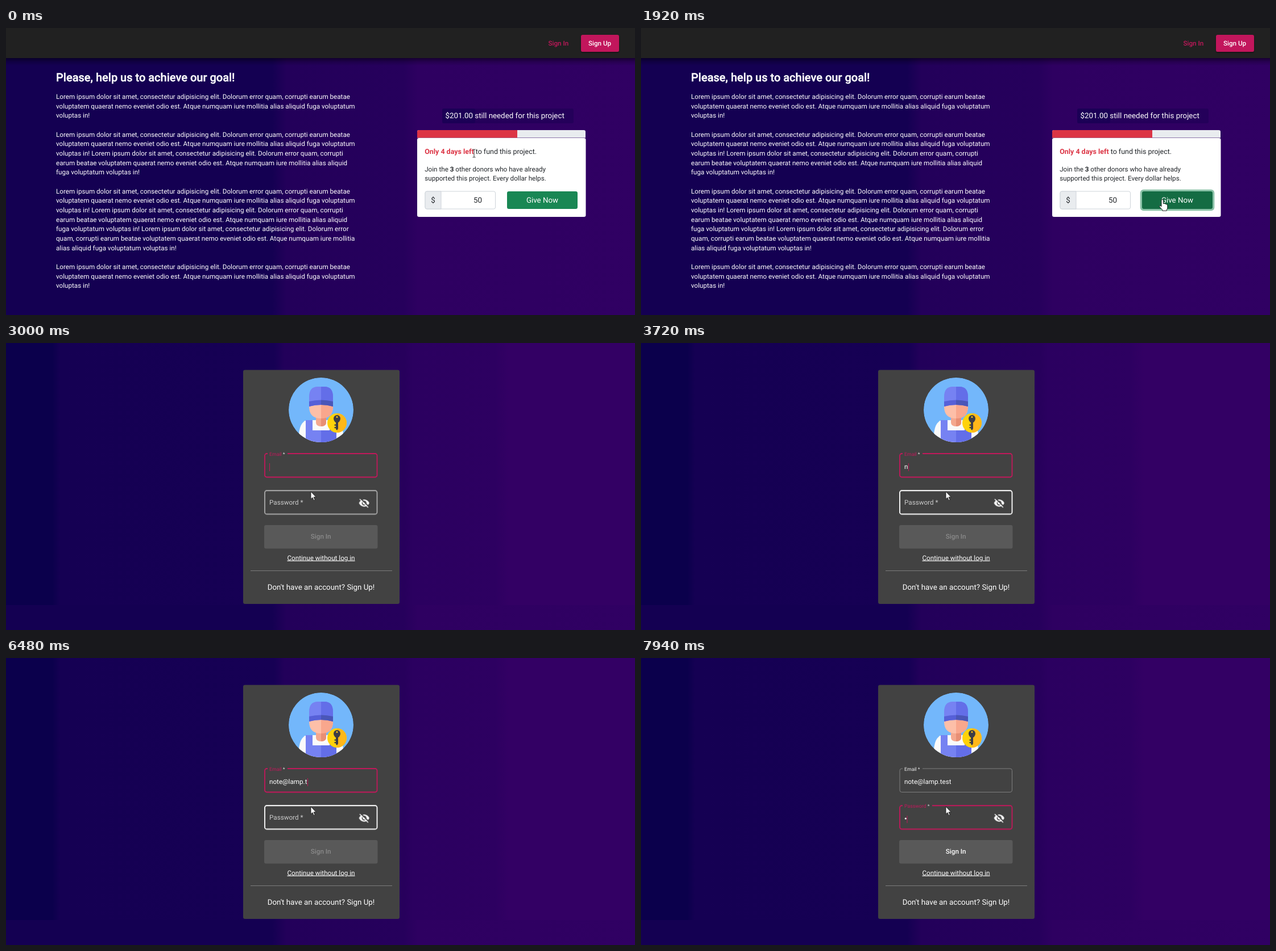
An HTML page for the animation above (8000 ms loop, 1106 by 506 pixels).

```html
<!DOCTYPE html>
<html lang="en">
<head>
<meta charset="utf-8">
<title>Fundraising sign in</title>
<style>
  html, body { margin: 0; width: 100%; height: 100%; overflow: hidden; background: #140052; }
  svg { display: block; width: 1106px; height: 506px; }
  text { font: 400 11.667px Roboto, sans-serif; fill: #fff; text-rendering: geometricPrecision; white-space: pre; }
  .lead { font-size: 13.333px; }
  .medium { font-weight: 500; }
  .mid { text-anchor: middle; }
  .dark text { fill: #212529; }
  .small { font-size: 8.75px; }
  .field { fill: none; stroke: #7f7f7f; }
  .caret { fill: #c2185b; }
</style>
</head>
<body>
<svg viewBox="0 0 1106 506">
  <defs>
    <linearGradient id="pageBg" gradientUnits="userSpaceOnUse" x2="1106">
      <stop offset=".423" stop-color="#140052"/><stop offset=".446" stop-color="#23005a"/>
      <stop offset=".632" stop-color="#26005c"/><stop offset=".655" stop-color="#2e0061"/>
      <stop offset="1" stop-color="#300063"/>
    </linearGradient>
    <linearGradient id="loginBg" gradientUnits="userSpaceOnUse" x2="1106">
      <stop offset=".074" stop-color="#0b004c"/><stop offset=".086" stop-color="#150053"/>
      <stop offset=".426" stop-color="#160054"/><stop offset=".443" stop-color="#22005a"/>
      <stop offset=".633" stop-color="#27005c"/><stop offset=".647" stop-color="#2b0060"/>
      <stop offset=".778" stop-color="#2d0061"/><stop offset=".8" stop-color="#330064"/>
    </linearGradient>
    <linearGradient id="navShade" x2="0" y2="1">
      <stop stop-opacity=".5"/><stop offset=".5" stop-opacity=".18"/><stop offset="1" stop-opacity="0"/>
    </linearGradient>
    <filter id="lift" x="-10%" y="-20%" width="120%" height="150%">
      <feDropShadow dx="0" dy="1.5" stdDeviation="1.2" flood-opacity=".5"/>
    </filter>
    <clipPath id="round"><circle cx="554" cy="118" r="57"/></clipPath>
    <clipPath id="rightHalf"><path d="M554 60h60v120h-60z"/></clipPath>
    <path id="notched" d="M0 0"/>
    <path id="cap" d="M533 112V95q0-18 15-18h12q15 0 15 18v17q-10-3-21-3t-21 3z"/>
    <path id="visor" d="M533 103q21-5 42 0v9q-10-3-21-3t-21 3z"/>
    <path id="face" d="M533 110q21-4 42 0v2q0 21-21 21t-21-21z"/>
    <path id="neck" d="M545 128h18v12q0 7-9 7t-9-7z"/>
    <path id="overall" d="M527 136h12v18h30v-18h12v40h-54z"/>
  </defs>

  <rect width="1106" height="506" fill="url(#pageBg)"/>

  <g id="project">
    <rect y="53" width="1106" height="13" fill="url(#navShade)"/>
    <rect width="1106" height="53" fill="#212121"/>
    <text class="medium mid" x="971.3" y="31" style="fill:#c2185b">Sign In</text>
    <rect x="1011" y="12" width="67" height="30" rx="3.3" fill="#c2185b" filter="url(#lift)"/>
    <text class="medium mid" x="1044" y="31">Sign Up</text>

    <text class="medium" x="88" y="94" style="font-size:20px" stroke="#fff" stroke-width=".4">Please, help us to achieve our goal!</text>
    <g id="story"></g>

    <rect x="767" y="142" width="231" height="26" rx="3" fill="#24005a"/>
    <rect x="767" y="142" width="58" height="26" rx="3" fill="#1b0056"/>
    <text class="lead" x="772.6" y="159.4">$201.00 still needed for this project</text>

    <path d="M723 193.5V183q0-3 3-3h290q3 0 3 3v10.5z" fill="#e9ecef"/>
    <path d="M723 193.5V183q0-3 3-3h173v13.5z" fill="#dc3545"/>
    <rect x="723" y="194" width="296.5" height="139" rx="3.3" fill="#fff"/>
    <g class="dark">
      <text x="736.2" y="221.5" style="font-size:12.45px"><tspan fill="#dc3545" font-weight="700">Only 4 days left</tspan> to fund this project.</text>
      <text x="736.2" y="252.5">Join the <tspan font-weight="700">3</tspan> other donors who have already</text>
      <text x="736.2" y="269.2">supported this project. Every dollar helps.</text>
      <rect x="737" y="288" width="123.5" height="31" rx="3" fill="#fff" stroke="#ced4da"/>
      <path d="M765 288v31h-25q-3 0-3-3v-25q0-3 3-3z" fill="#e9ecef" stroke="#ced4da"/>
      <text class="lead mid" x="751" y="307.8">$</text>
      <text class="lead" x="822" y="307.8">50</text>
    </g>
    <rect id="ring" x="877.7" y="284.7" width="130.6" height="37.6" rx="6" fill="#8cc3a9"/>
    <rect id="give" x="881" y="288" width="124" height="31" rx="3.3"/>
    <text class="lead mid" x="943" y="307.8">Give Now</text>
  </g>

  <g id="login">
    <rect width="1106" height="462" fill="url(#loginBg)"/>
    <rect x="417" y="47.5" width="275" height="412.5" rx="3.3" fill="#424242"/>

    <g clip-path="url(#round)">
      <circle cx="554" cy="118" r="57" fill="#73b7fb"/>
      <path d="M515 176q-2-36 14-40h50q16 4 14 40z" fill="#fafafa"/>
      <use href="#overall" fill="#7682f2"/>
      <use href="#neck" fill="#f4a88f"/>
      <use href="#face" fill="#fdbfa8"/>
      <use href="#cap" fill="#7682f2"/>
      <use href="#visor" fill="#5660d8"/>
      <g clip-path="url(#rightHalf)">
        <use href="#overall" fill="#636ee8"/>
        <use href="#neck" fill="#e88f75"/>
        <use href="#face" fill="#f9a78d"/>
        <use href="#cap" fill="#636ee8"/>
        <use href="#visor" fill="#4a56b8"/>
      </g>
    </g>
    <circle cx="582" cy="141" r="17" fill="#ffd20a"/>
    <path d="M582 124a17 17 0 0 1 0 34z" fill="#ffb81a"/>
    <path d="M580 138h4v13l-2 3-2-2zM577.5 143.5h3v2.2h-3zM577.5 148h3v2.2h-3z" fill="#3d3d46"/>
    <path fill-rule="evenodd" d="M576 133a6 6 0 0 1 12 0q0 4-3.5 7h-5q-3.5-3-3.5-7zM580.5 130.5a1.5 1.5 0 0 1 3 0a1.5 1.5 0 0 1-3 0z" fill="#3d3d46"/>

    <path id="emailBox" class="field" d="M495 195H649a3.5 3.5 0 0 1 3.5 3.5V233a3.5 3.5 0 0 1-3.5 3.5H458.5a3.5 3.5 0 0 1-3.5-3.5V198.5a3.5 3.5 0 0 1 3.5-3.5H460"/>
    <text class="small" x="463" y="199"><tspan id="emailLabel">Email</tspan> <tspan fill="#ddd">*</tspan></text>
    <text id="email" x="463" y="222.3"></text>
    <rect id="emailCaret" class="caret" y="212" width="1" height="14"/>

    <g transform="translate(0 65.2)">
      <rect id="passIdle" class="field" x="455" y="195" width="197.5" height="41.5" rx="3.5"/>
      <path id="passActive" class="field" d="M512 195H649a3.5 3.5 0 0 1 3.5 3.5V233a3.5 3.5 0 0 1-3.5 3.5H458.5a3.5 3.5 0 0 1-3.5-3.5V198.5a3.5 3.5 0 0 1 3.5-3.5H460" style="stroke:#c2185b;stroke-width:1.8px"/>
    </g>
    <g id="passLabel"><text><tspan id="passWord">Password</tspan> <tspan fill="#ccc">*</tspan></text></g>
    <circle id="dot" cx="465.3" cy="283" r="1.6" fill="#fff"/>
    <rect id="passCaret" class="caret" y="278" width="1" height="13"/>

    <text id="iconName" x="620" y="291" style="font:17.6px 'Liberation Serif',serif">visibility_off</text>
    <g id="eye" transform="translate(629.7 282.2)" fill="#fff">
      <path d="M-9 0C-5.5-8.3 5.5-8.3 9 0C5.5 8.3-5.5 8.3-9 0z"/>
      <circle r="4.2" fill="#424242"/><circle r="2.5"/>
      <path d="M-6.5-8.5L8.5 6.5" stroke="#424242" stroke-width="1.8"/>
      <path d="M-7.8-7L7 7.7" stroke="#fff" stroke-width="1.5"/>
    </g>

    <rect id="submitShade" x="454" y="321" width="199.5" height="41.5" rx="3.3" fill="#c2185b" filter="url(#lift)"/>
    <rect id="submit" x="454" y="321" width="199.5" height="41.5" rx="3.3"/>
    <text id="submitText" class="medium mid" x="553.7" y="345.3">Sign In</text>
    <text class="mid" x="554" y="382.5" text-decoration="underline">Continue without log in</text>
    <path d="M430 401.5H679" stroke="#7c7c7c"/>
    <text id="signUp" class="lead mid" x="554" y="435">Don't have an account? Sign Up!</text>
  </g>

  <g id="cursor">
    <path id="beam" d="M-2.5-7H-1Q0-7 0-6Q0-7 1-7H2.5M0-6V6M-2.5 7H-1Q0 7 0 6Q0 7 1 7H2.5" fill="none" stroke="#333"/>
    <path id="hand" d="M-3 1a1.7 1.7 0 0 1 3.4 0v5.5q2.6-.7 3 .6q2.2-.4 2.6 1q1.8 0 1.8 1.8v4q0 1.6-1.5 3.6v1.7h-7.5v-1.7L-6 12.5q-1-2.4 1-2.6l2 1.8z" fill="#fff" stroke="#111" stroke-width=".9"/>
    <path id="arrow" d="M0 0V13.2l3-2.7l2.2 5l2-.9l-2.2-4.8h4.2z" fill="#fff" stroke="#111" stroke-width=".8"/>
  </g>
</svg>

<script>
const LOOP = 8000;
const PINK = '#c2185b';
const $ = id => document.getElementById(id);
const SVG = 'http://www.w3.org/2000/svg';

function addText(parent, tag, content, attrs = {}) {
  const el = document.createElementNS(SVG, tag);
  el.textContent = content;
  for (const key in attrs) el.setAttribute(key, attrs[key]);
  return parent.appendChild(el);
}

// Holds each value from its time until the next stop.
function track(el, prop, stops) {
  const last = stops[stops.length - 1][1];
  const frames = [...stops, [LOOP, last]].map(([time, value]) =>
    ({ offset: time / LOOP, [prop]: value, easing: 'step-end' }));
  el.animate(frames, { duration: LOOP, iterations: Infinity });
}

// Visible only inside the given [from, to] spans.
function show(el, spans, prop = 'opacity') {
  const stops = spans[0][0] > 0 ? [[0, 0]] : [];
  for (const [from, to] of spans) {
    stops.push([from, 1]);
    if (to) stops.push([to, 0]);
  }
  track(el, prop, stops);
}

const move = (el, stops) =>
  track(el, 'transform', stops.map(([time, x, y, scale = 1]) =>
    [time, `translate(${x}px, ${y}px) scale(${scale})`]));

// Story paragraphs; an empty line separates them.
const opening = 'Lorem ipsum dolor sit amet, consectetur adipisicing elit. Dolorum error quam, corrupti earum beatae';
const second = 'voluptatem quaerat nemo eveniet odio est. Atque numquam iure mollitia alias aliquid fuga voluptatum';
const repeat = 'voluptas in! Lorem ipsum dolor sit amet, consectetur adipisicing elit. Dolorum error quam, corrupti';
const third = 'earum beatae voluptatem quaerat nemo eveniet odio est. Atque numquam iure mollitia alias aliquid';
const brief = [opening, second, 'voluptas in!', ''];
[
  ...brief,
  opening, second, repeat, third, 'fuga voluptatum voluptas in!', '',
  opening, second, repeat, third,
  'fuga voluptatum voluptas in! Lorem ipsum dolor sit amet, consectetur adipisicing elit. Dolorum error',
  'quam, corrupti earum beatae voluptatem quaerat nemo eveniet odio est. Atque numquam iure mollitia',
  'alias aliquid fuga voluptatum voluptas in!', '',
  ...brief
].forEach((line, i) => addText($('story'), 'text', line, { x: 88, y: 125 + i * 50 / 3 }));

// Scenes and pointer
show($('project'), [[0, 2040]]);
show($('login'), [[2040]]);
move($('cursor'), [
  [0, 823, 221], [660, 840, 226], [800, 881, 255], [940, 897, 276],
  [1060, 908, 291], [1180, 915, 300], [1300, 918, 303], [2040, 917, 303],
  [2520, 860, 290], [2640, 745, 273], [2760, 635, 264], [2880, 556, 261], [3000, 536, 262]
]);
show($('beam'), [[0, 940]]);
show($('hand'), [[1060, 2040]]);
show($('arrow'), [[940, 1060], [2040]]);
track($('give'), 'fill', [[0, '#198754'], [1060, '#157347'], [1800, '#146c43']]);
show($('ring'), [[1800, 2040]]);

// Page finishing its load
show($('iconName'), [[2040, 2160]]);
show($('eye'), [[2160]]);
show($('submitShade'), [[2040, 2280]]);
track($('submit'), 'fill', [[0, PINK], [2160, '#8e3a5a'], [2280, '#595959']]);
track($('submitText'), 'fill', [[0, 'rgba(255,255,255,.3)'], [7940, '#fff']]);
track($('signUp'), 'fill', [[0, '#000'], [2160, '#fff']]);

// Email typing
const address = 'note@lamp.test';
const keyTimes = [3720, 3840, 4230, 4350, 5110, 5490, 5740, 5860, 5980, 6230, 6480, 6600, 6720, 6840];
const email = $('email');
[...address].forEach((letter, i) =>
  show(addText(email, 'tspan', letter), [[keyTimes[i]]], 'fillOpacity'));
move($('emailCaret'), [[0, 463, 0], ...keyTimes.map((time, i) =>
  [time, 463.5 + email.getSubStringLength(0, i + 1), 0])]);
show($('emailCaret'), [[2040, 2520], [3000, 3600], [3720, 4980], [5110, 6960]]);
track($('emailBox'), 'stroke', [[0, PINK], [6960, '#7f7f7f']]);
track($('emailBox'), 'strokeWidth', [[0, '1.8px'], [6960, '1px']]);
track($('emailLabel'), 'fill', [[0, PINK], [6960, '#eee']]);

// Password field
show($('passIdle'), [[0, 6960]]);
show($('passActive'), [[6960]]);
track($('passIdle'), 'stroke', [[0, '#7f7f7f'], [3000, '#aaa'], [3120, '#fff']]);
track($('passIdle'), 'strokeWidth', [[0, '1px'], [2880, '1.8px']]);
move($('passLabel'), [[0, 463, 285.3], [7080, 463, 272, .85], [7200, 463, 264.2, .75]]);
track($('passWord'), 'fill', [[0, '#ccc'], [6960, PINK]]);
move($('passCaret'), [[0, 463, 0], [7940, 467.5, 0]]);
show($('passCaret'), [[6960, 7440], [7940]]);
show($('dot'), [[7940]]);
</script>
</body>
</html>
```
